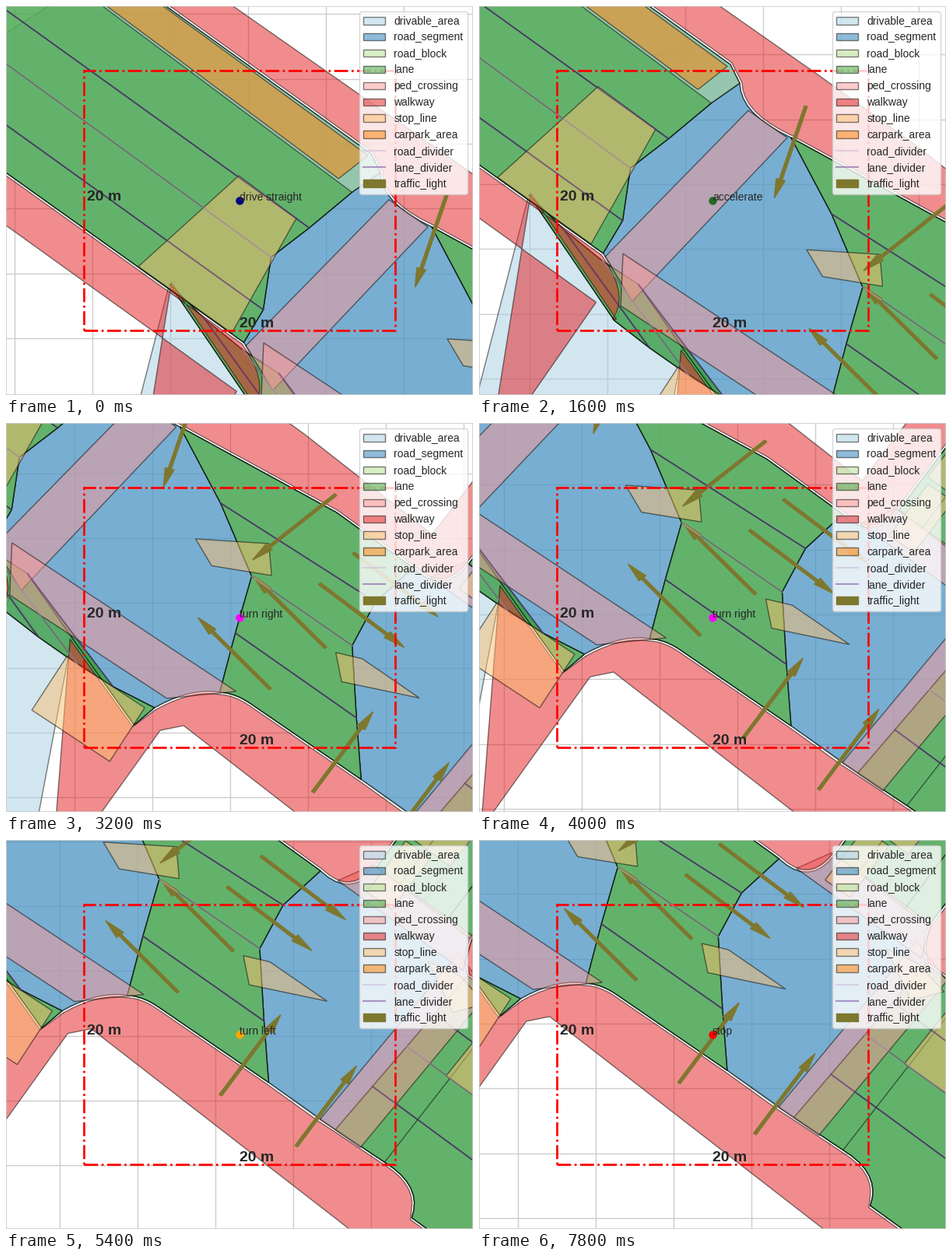
These frames come from a looping animation (600x500 px, 8000 ms). A matplotlib script:

```python
import numpy as np
import matplotlib.pyplot as plt
from matplotlib.animation import FuncAnimation
from matplotlib.patches import Arrow, Polygon, Rectangle
from matplotlib.ticker import MultipleLocator

plt.rcParams.update({"font.family": "Liberation Sans", "text.color": ".15",
                     "font.size": 10})

COLORS = dict(drivable_area="#a6cee3", road_segment="#1f78b4",
              road_block="#b2df8a", lane="#33a02c", ped_crossing="#fb9a99",
              walkway="#e31a1c", stop_line="#fdbf6f", carpark_area="#ff7f00",
              road_divider="#cab2d6", lane_divider="#6a3d9a",
              traffic_light="#7e772e")
FRAMES, STEP = 40, 200
SPAN = 30                        # metres across the view
SCALE = np.array([20, -50 / 3])  # map units per metre
ORIGIN = np.array([61, 475])
GAP = 3                          # between curb and walkway

fig = plt.figure(figsize=(6, 5), dpi=100)
ax = fig.add_axes([0, 0, 1, 1])
for axis in (ax.xaxis, ax.yaxis):
    axis.set_major_locator(MultipleLocator(5))
ax.tick_params(length=0, labelbottom=False, labelleft=False)
ax.grid(True, color=".8", lw=1)
ax.set_axisbelow(True)
for spine in ax.spines.values():
    spine.set(edgecolor=".8", linewidth=1.25)


# Geometry helpers, in map units with y pointing down

def metres(points):
    return (np.array(points, float) - ORIGIN) / SCALE


def join(*parts):
    return np.vstack([np.atleast_2d(p) for p in parts])


def ray(start, slope, dx):
    return np.array([start, (start[0] + dx, start[1] + slope * dx)])


def bend(a, control, b, steps=9):
    u = np.linspace(0, 1, steps)[:, None]
    a, control, b = map(np.array, (a, control, b))
    return a * (1 - u) ** 2 + 2 * control * u * (1 - u) + b * u ** 2


def between(a, b, fractions):
    a, b = np.array(a), np.array(b)
    return [a + (b - a) * f for f in fractions]


def quad(corner, side, other):
    corner, side, other = map(np.array, (corner, side, other))
    return [corner, corner + side, corner + side + other, corner + other]


def outline(edges):
    """Polygon spanned by neighbouring edges that run the same way."""
    inner = edges[1:-1]
    return join(edges[0], *[e[-1] for e in inner], edges[-1][::-1],
                *[e[0] for e in inner[::-1]])


def mouth(road, end=0):
    return join(*[edge[end] for edge in road])


def offset(points, distance):
    tx, ty = np.gradient(points, axis=0).T
    return points + distance * np.c_[ty, -tx] / np.hypot(tx, ty)[:, None]


# Drawing helpers

named = set()


def label(layer):
    if layer in named:
        return None
    named.add(layer)
    return layer


def area(layer, *polygons):
    for points in polygons:
        ax.add_patch(Polygon(metres(points), fc=COLORS[layer], ec="k", lw=1,
                             alpha=0.5, label=label(layer)))


def line(layer, points):
    ax.plot(*metres(points).T, color=COLORS[layer], lw=1.5, alpha=0.5,
            label=label(layer))


def arrow(layer, tail, vector):
    ax.add_patch(Arrow(*metres(tail), *(vector / SCALE), color=COLORS[layer],
                       label=label(layer)))


# Roads: five edges each, from the junction outwards
west = [ray(p, slope, -440) for p, slope in (
    ((194.5, 37.5), .747), ((139.5, 83.3), .719), ((90.5, 121), .73),
    ((80.5, 188.5), .719), ((55.5, 230.5), .7145))]
verge = join((231, 12), ray((219, -12), .72, -333))
middle = [join((297, 82), (498, 192), (596, 263)),
          join((349, 180), (548, 307)),
          join((389, 274), (518, 363)),
          join((368, 347), (523.5, 456)),
          join(bend((348, 423), (368, 424), (388, 438)), (529.5, 535))]
east = [ray(p, .735, 240) for p in
        between((785, 398), (615.5, 595.5), (0, .25, .46, .72))]
east.append(join((615.5, 595.5),
                 bend((678.5, 637.5), (728, 668), (713.5, 709)), (860, 815)))
north = [ray(p, -1.33, 180) for p in
         between((668, 258), (788, 350), np.linspace(0, 1, 5))]
south = [ray(p, slope, -110) for p, slope in (
    ((70, 317), 1.47), ((115, 352), 1.38), ((165, 387), 1.33),
    ((211, 416), 1.32))]
south.append(join((264, 443), ray((238, 465), 1.4, -80)))
roads = [west, middle, east, north, south]

# Rounded corners, then the four curbs clockwise
north_west = bend((231, 12), (232, 52), (297, 82))
north_east = bend((596, 263), (635, 300), (668, 258))
south_east = bend((788, 350), (778, 374), (785, 398))
south_mid = bend((348, 423), (310, 417), (264, 443))
south_west = bend((70, 317), (94, 284), (55.5, 230.5))
curb_n = join(verge[::-1], north_west, middle[0], north_east, north[0])
curb_e = join(north[-1][::-1], south_east, east[0])
curb_s = join(east[-1][::-1], (595.5, 582.5), middle[-1][::-1], south_mid,
              south[-1])
curb_w = join(south[0][::-1], south_west, west[-1])

halves = [half for road in roads for half in (road[:3], road[2:])]
halves[0] = [verge] + halves[0]

area("drivable_area",
     join(curb_n, curb_e, curb_s, (100, 660), (-170, 660), curb_w))
area("road_segment", outline([verge] + west), *map(outline, roads[1:]),
     join(north_west, mouth(middle), south_mid, mouth(south)[::-1],
          south_west, mouth(west)[::-1]),
     join(north_east, mouth(north), south_east, mouth(east),
          mouth(middle, -1)[::-1]))
area("road_block", *map(outline, halves))
for road in roads:
    area("lane", *[outline(road[i:i + 2]) for i in range(4)])
area("road_block", [(678.5, 637.5), (818, 458)])  # seam between two blocks
area("ped_crossing",
     [(242, 47), (292, 82), (93, 292), (58, 235)],
     [(81, 231), (369, 422), (280, 431), (78, 298)],
     [(595.5, 582.5), (647.5, 618.5), (812, 420), (773, 369)],
     [(618.5, 275.5), (663.5, 255.5), (792, 347), (779, 391)])
area("walkway",
     join(offset(curb_n, GAP), (760, 38), (621, 220), (455, 90), (330, 0),
          (-30, -252)),
     join(offset(curb_w, GAP), (-385, -17), (46.5, 293.5), (-92, 493)),
     join(offset(curb_s, GAP), (131, 668), (271.5, 472), (301.5, 466),
          (652.5, 738.5), (800, 854)),
     join(offset(curb_e, GAP), (1000, 300)))
area("stop_line",
     [(49, 16.3), (123, 71), (40, 218.5), (-80, 133)],
     [(317, 226), (411, 232), (414.5, 273), (337.5, 260.5)],
     [(497, 372), (531, 380), (604.5, 430.5), (504.5, 409.5)],
     [(734, 379), (775, 398), (808, 434), (766, 445)],
     quad((151.5, 377), (100, 66), (-45, 69)),
     quad((757.5, 526.5), (53, -66), (91, 65)),
     quad((655.5, 290.5), (50, -66), (32, 22)),
     quad((705, 215), (28, -35), (57, 42)))
area("carpark_area",
     join(ray((215, -9.7), .73, -440)[::-1], ray((177.3, 20), .745, -440)))
for road in roads:
    line("road_divider", road[2])
for road in west, middle, east, south:
    line("lane_divider", road[1])
    line("lane_divider", road[3])
for vector, tails in (((-40.5, 118), [(316, 41.5)]),
                      ((-107, 84), [(497, 169)]),
                      ((-93, -92), [(413, 419), (484, 366)]),
                      ((109, 82), [(476, 283.5), (519.5, 244)]),
                      ((77.5, -103.5), [(467.5, 551.5), (565, 617)])):
    for tail in tails:
        arrow("traffic_light", tail, vector)

# Fixed overlay
view = ax.transAxes
ax.add_patch(Rectangle((1 / 6, 1 / 6), 2 / 3, 2 / 3, fill=False, ec="red",
                       lw=2, ls="-.", transform=view))
for x, y in ((104 / 600, 0.5), (0.5, 52 / 300)):
    ax.text(x, y, "20 m", size=14, weight="bold", transform=view)
dot, = ax.plot(0.5, 0.5, "o", ms=7.5, mew=0, transform=view)
action = ax.text(0.5, 0.5, "", transform=view)
entries = dict(zip(*ax.get_legend_handles_labels()[::-1]))
ax.legend([entries[name] for name in COLORS], COLORS, loc="upper right",
          frameon=True, framealpha=0.8, edgecolor=".8")

# Route of the vehicle: knots joined by cubic Hermite curves
times = np.array([0, 8, 12, 16, 24, 32, 39])
route = np.array([(50, 48.1), (196, 162.7), (300, 250), (373.3, 327),
                  (468.7, 449), (510.7, 488.6), (510.7, 489)])
speed = np.gradient(route, times, axis=0, edge_order=2)
speed[-2:] = 0

ACTIONS = [(0, "drive straight", "navy"), (6, "accelerate", "#226b22"),
           (10, "turn right", "magenta"), (21, "turn left", "orange"),
           (30, "stop", "red")]


def position(n):
    i = min(np.searchsorted(times, n, side="right") - 1, len(times) - 2)
    h = times[i + 1] - times[i]
    u = (n - times[i]) / h
    ease = u * u * (3 - 2 * u)
    return (route[i] * (1 - ease) + route[i + 1] * ease
            + h * u * (1 - u) * (speed[i] * (1 - u) - speed[i + 1] * u))


def update(n):
    x, y = metres(position(n))
    ax.set_xlim(x - SPAN / 2, x + SPAN / 2)
    ax.set_ylim(y - SPAN / 2, y + SPAN / 2)
    _, word, color = [a for a in ACTIONS if a[0] <= n][-1]
    action.set_text(word)
    dot.set_color(color)
    return dot, action


anim = FuncAnimation(fig, update, frames=FRAMES, interval=STEP, repeat=True,
                     repeat_delay=0, blit=False)
plt.show()
```
